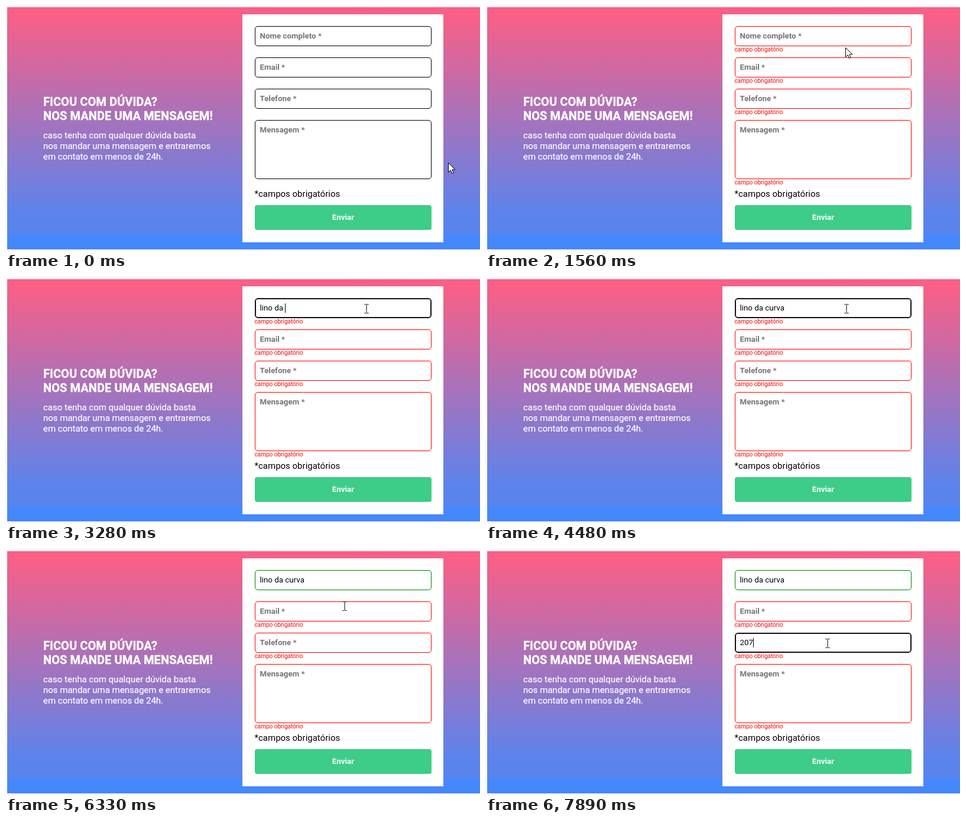
These frames come from a looping animation (802x413 px, 8000 ms). An HTML page:

```html
<!DOCTYPE html>
<html lang="pt-BR">
<head>
<meta charset="utf-8">
<title>Formulário de contato</title>
<style>
  html, body { margin: 0; width: 100%; height: 100%; overflow: hidden; background: #fff; }
  body { position: relative; font-family: Roboto, sans-serif; }
  body * { box-sizing: border-box; }
  .back, .panel, .intro, .field, .note, .send, .field > *, .spot, .cursor { position: absolute; }
  .back { inset: 2px 0 1px 2px; background: linear-gradient(#ff5e83, #5a84ec 86% 93.6%, #4588fb 93.6%); }
  .panel { left: 400px; top: 14px; width: 340px; height: 386px; background: #fff; }

  .intro { left: 63px; top: 150px; color: #fff; white-space: nowrap; -webkit-text-stroke: .2px #fff; }
  h1 { margin: 0 0 12px; font: 700 20px/24px Roboto, sans-serif; letter-spacing: .07px; -webkit-text-stroke-width: .4px; }
  .intro p { margin: 0; font-size: 15px; line-height: 18px; }

  .field {
    left: 421px; width: 299px; height: 34px;
    border: 1px solid #000; border-radius: 5px;
    font-size: 13.333px; line-height: 16px; white-space: pre;
  }
  .area { height: 100px; }
  .hint, .value { left: 7.5px; top: 8px; }
  .hint { font-weight: 700; color: #757575; }
  .value { display: flex; color: #000; }
  .caret { width: 1px; height: 16px; background: #000; }
  .error { left: -1.5px; top: calc(100% + 1px); font-size: 10px; line-height: 12px; color: #f00; visibility: hidden; }
  .bad { border-color: #f00; }
  .bad .error { visibility: visible; }
  .good { border-color: #008000; }
  .focus { border-color: #101010; box-shadow: inset 0 0 0 1px #101010; }

  .note { left: 420.5px; top: 309px; font-size: 15px; line-height: 18px; color: #000; white-space: nowrap; }
  .send {
    left: 421px; top: 337px; width: 299px; height: 42px; border-radius: 4px;
    background: #3dcd88; color: #fff; font: 700 13.333px/42px Roboto, sans-serif; text-align: center;
  }
  .spot { left: -12px; top: -12px; width: 24px; height: 24px; border-radius: 50%; background: rgba(255, 235, 0, .55); }
  .cursor { left: 0; top: 0; }
  .cursor svg { position: absolute; overflow: visible; width: 20px; height: 25px; fill: #fff; stroke: #000; }
  .arrow { left: 0; top: 0; }
  .hand { left: -6px; top: 0; stroke-linejoin: round; }
  .cursor .beam { left: -3.5px; top: -8px; fill: none; }
</style>
</head>
<body>
<div class="back"></div>
<div class="intro">
  <h1>FICOU COM DÚVIDA?<br>NOS MANDE UMA MENSAGEM!</h1>
  <p>caso tenha com qualquer dúvida basta<br>nos mandar uma mensagem e entraremos<br>em contato em menos de 24h.</p>
</div>
<div class="panel"></div>
<div class="note">*campos obrigatórios</div>
<div class="send">Enviar</div>
<div class="cursor">
  <div class="spot"></div>
  <svg class="arrow"><path d="M.5.5v16l3.7-3.6 2.4 5.6 2.6-1.1-2.4-5.5h5.2z"/></svg>
  <svg class="hand"><path d="M5.5 14V2.4a1.9 1.9 0 0 1 3.8 0V8.5a1.7 1.7 0 0 1 3.2.6a1.7 1.7 0 0 1 3.1.9a1.6 1.6 0 0 1 3 1V15c0 3-2 4.5-2.3 8.5H8.3c-.3-3-3.5-5.5-6.5-9c-1.2-1.7.8-3.3 2.2-2.2z"/><path d="M9.3 8.5v3.5M12.5 9.1v3.2M15.6 10v2.6"/></svg>
  <svg class="beam"><path d="M0 .5h2.5l1 1 1-1H7M3.5 1.5v13M0 15.5h2.5l1-1 1 1H7"/></svg>
</div>
<script>
const LOOP = 8000, BLINK = 530, PRESS = 130;
const ERRORS_AT = 1010;
const clicks = [940, 1900, 5580, 7080];
const $ = (s, root = document) => root.querySelector(s);
const cursor = $('.cursor'), spot = $('.spot');
const shapes = { arrow: $('.arrow'), hand: $('.hand'), beam: $('.beam') };

// words: text with the times of its first and last key
const fields = [
  { label: 'Nome completo', focus: clicks[1], blur: clicks[2],
    words: [['lino ', 2620, 3020], ['da ', 3220, 3280], ['curva', 3480, 3950]] },
  { label: 'Email' },
  { label: 'Telefone', focus: clicks[3], words: [['207', 7700, 7890]] },
  { label: 'Mensagem', height: 100 }
].map((f, i) => ({ height: 34, words: [], focus: LOOP, blur: LOOP, top: 34 + 53 * i, ...f }));

// curved pointer moves: end point and the control point that bends the way
const home = [748, 265];
const moves = [
  { from: 70, to: 810, bend: [668, 460], end: [674, 365] },
  { from: 1070, to: 1700, bend: [600, 110], end: [609.5, 52] },
  { from: 4500, to: 5250, bend: [660, 90], end: [651, 347] },
  { from: 5950, to: 6370, bend: [590, 260], end: [571.5, 87] },
  { from: 6370, to: 6960, bend: [563, 124], end: [575.5, 154] },
  { from: 7150, to: 7700, bend: [575.5, 158], end: [577.5, 158] }
];

for (const f of fields) {
  const el = f.el = document.createElement('div');
  el.className = f.height > 34 ? 'field area' : 'field';
  el.style.top = f.top + 'px';
  el.innerHTML = `<span class="hint">${f.label} *</span>` +
    '<span class="value"><span class="text"></span><i class="caret"></i></span>' +
    '<span class="error">campo obrigatório</span>';
  f.ui = { hint: $('.hint', el), text: $('.text', el), caret: $('.caret', el) };
  cursor.before(el);
}

const within = (t, from, to) => t >= from && t < to;
const ease = k => k * k * (3 - 2 * k);
const show = (el, on) => { el.style.visibility = on ? 'visible' : 'hidden'; };

function pointerAt(t) {
  let start = home;
  for (const { from, to, bend, end } of moves) {
    if (t < from) break;
    if (t < to) {
      const k = ease((t - from) / (to - from)), r = 1 - k;
      return start.map((p, i) => r * r * p + 2 * r * k * bend[i] + k * k * end[i]);
    }
    start = end;
  }
  return start;
}

function shapeAt(x, y) {
  if (!within(x, 421, 720)) return 'arrow';
  if (within(y, 337, 379)) return 'hand';
  return fields.some(f => within(y, f.top, f.top + f.height)) ? 'beam' : 'arrow';
}

// typed text and the time of the last key, spread evenly over each word
function typedAt(f, t) {
  let text = '', last = f.focus;
  for (const [word, first, end] of f.words) {
    if (t < first) break;
    const gap = (end - first) / (word.length - 1);
    const n = Math.min(word.length, Math.floor((t - first) / gap) + 1);
    text += word.slice(0, n);
    last = first + (n - 1) * gap;
  }
  return { text, last };
}

function drawField(f, t) {
  const { text, last } = typedAt(f, t);
  const focused = within(t, f.focus, f.blur);
  const valid = text !== '' && t >= f.blur;
  f.el.classList.toggle('bad', t >= ERRORS_AT && !valid);
  f.el.classList.toggle('good', valid);
  f.el.classList.toggle('focus', focused);
  f.ui.text.textContent = text;
  show(f.ui.hint, !text);
  show(f.ui.caret, focused && Math.floor((t - last) / BLINK) % 2 === 0);
}

function draw(t) {
  fields.forEach(f => drawField(f, t));
  const [x, y] = pointerAt(t);
  const shape = shapeAt(x, y);
  const snap = shape === 'beam' ? Math.floor(x) + .5 : Math.round(x);
  cursor.style.transform = `translate(${snap}px, ${Math.round(y)}px)`;
  for (const name in shapes) show(shapes[name], name === shape);
  show(spot, clicks.some(c => within(t, c, c + PRESS)));
}

const start = performance.now();
function tick() {
  draw((performance.now() - start) % LOOP);
  requestAnimationFrame(tick);
}
tick();
</script>
</body>
</html>
```
